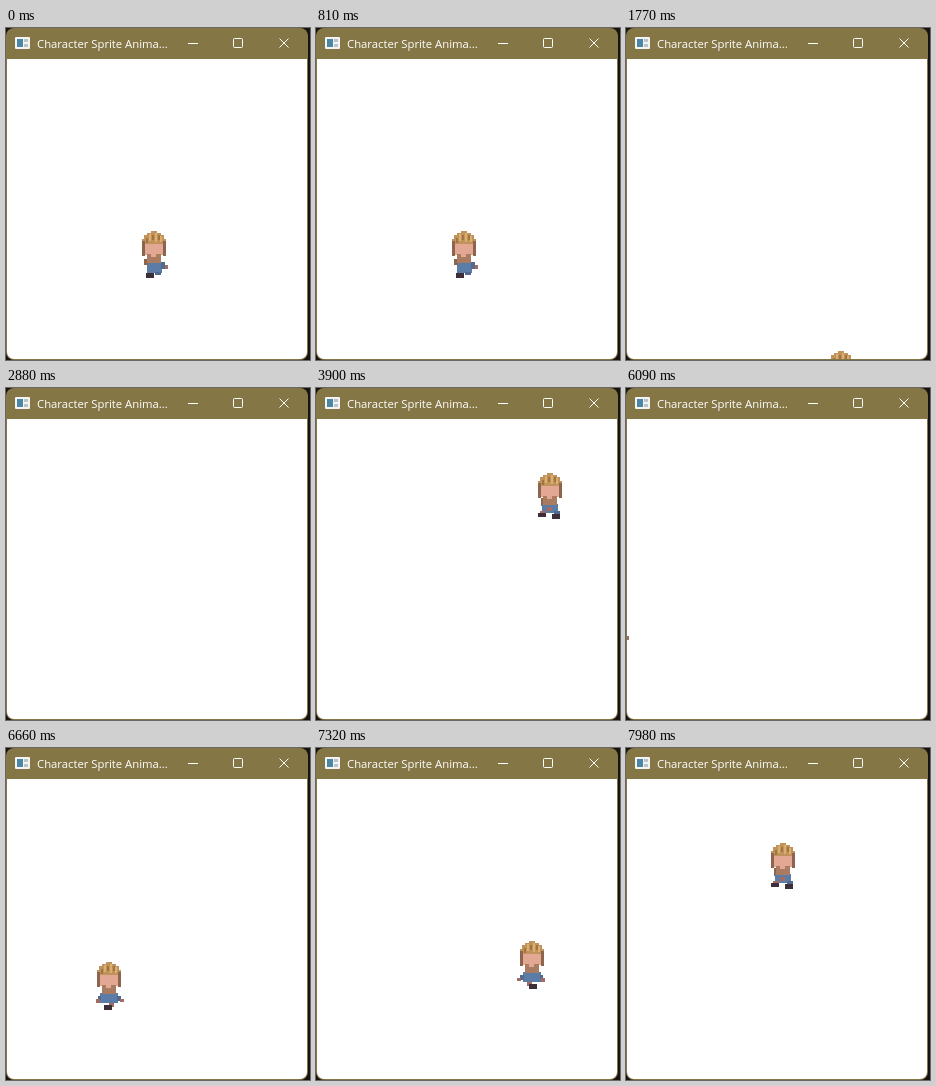
An HTML page with a canvas that plays this animation: 304 by 332 pixels, repeating every 8000 ms.

```html
<!DOCTYPE html>
<html lang="en">
<head>
<meta charset="utf-8">
<title>Sprite walk</title>
<style>
html, body { margin: 0; width: 100%; height: 100%; overflow: hidden; background: #17140f; }
canvas { display: block; }
</style>
</head>
<body>
<canvas width="304" height="332"></canvas>
<script>
const ctx = document.querySelector('canvas').getContext('2d');
const LOOP = 8000, TICK = 30, POSE_TIME = 100;
const BAR = '#857645';

// Way points of the head's top left corner: time, x, y.
const path = [
  [0, 136, 203], [815, 136, 203], [1435, 136, 323], [2010, 251, 323],
  [2440, 251, 237], [2700, 303, 237], [3460, 303, 85], [3495, 303, 85],
  [4560, 90, 85], [5130, -27, 85], [5280, -55, 85], [5930, -55, 214],
  [6090, -23, 214], [6660, 91, 214], [7220, 204, 214], [7690, 204, 117],
  [7800, 182, 95], [8000, 141, 95]
];

const colors = {
  hair: '#c0935d', light: '#dbb06c', dark: '#a17345', side: '#8d644d',
  skin: '#e3a893', beard: '#a97b60', shirt: '#5c7ca8', sleeve: '#526a90',
  hand: '#a06c63', shoe: '#3d2f39'
};

const head = [
  ['hair', 9, 0, 6, 4], ['hair', 5, 2, 14, 4], ['hair', 2, 4, 20, 5], ['hair', 0, 8, 24, 8],
  ['light', 7, 3, 2, 7], ['light', 13, 2, 2, 9], ['light', 18, 5, 2, 6],
  ['dark', 10, 4, 2, 5], ['dark', 4, 7, 2, 5], ['dark', 16, 4, 2, 5],
  ['side', 0, 10, 3, 15], ['side', 21, 10, 3, 15],
  ['skin', 3, 13, 18, 11], ['beard', 5, 23, 14, 9], ['skin', 9, 23, 5, 3]
];
const contact = [
  ['shirt', 5, 31, 15, 11], ['sleeve', 19, 31, 4, 7], ['hand', 23, 34, 3, 4],
  ['side', 2, 28, 4, 6], ['shoe', 4, 42, 8, 5], ['sleeve', 13, 41, 6, 3]
];
const passing = [
  ['shirt', 3, 31, 18, 10], ['sleeve', 0, 34, 4, 5], ['sleeve', 20, 34, 3, 4],
  ['hand', -3, 37, 4, 3], ['hand', 21, 37, 4, 4],
  ['hand', 7, 41, 5, 4], ['shoe', 9, 43, 8, 5]
];
const stride = [
  ['side', 3, 25, 4, 8], ['shirt', 4, 31, 16, 9], ['hand', 9, 34, 5, 4],
  ['hand', 2, 38, 6, 3], ['shoe', 0, 40, 8, 4], ['sleeve', 16, 38, 6, 4], ['shoe', 14, 41, 8, 5]
];
const mirror = parts => parts.map(([c, x, y, w, h]) => [c, 24 - x - w, y, w, h]);
const poses = [contact, passing, mirror(passing), stride];

function rect(color, x, y, w, h) {
  ctx.fillStyle = color;
  ctx.fillRect(x, y, w, h);
}

function panel(color, x, y, w, h, radii) {
  ctx.fillStyle = color;
  ctx.beginPath();
  ctx.roundRect(x, y, w, h, radii);
  ctx.fill();
}

function positionAt(t) {
  const next = path.findIndex(p => p[0] > t);
  const [t0, x0, y0] = path[next - 1], [t1, x1, y1] = path[next];
  const k = (t - t0) / (t1 - t0);
  return [Math.round(x0 + (x1 - x0) * k), Math.round(y0 + (y1 - y0) * k)];
}

function drawWindow() {
  rect('#17140f', 0, 0, 304, 332);
  panel(BAR, 0, 0, 302, 332, 8);
  panel('#fff', 1, 31, 300, 300, [0, 0, 7, 7]);

  panel('#f4f4f4', 9, 9, 15, 12, 1);
  rect('#4a87a5', 11, 11, 6, 8);
  rect('#b9c3c8', 18, 11, 4, 3);
  rect('#b9c3c8', 18, 16, 4, 3);

  ctx.fillStyle = '#fff';
  ctx.font = '11.3px "Open Sans", "Noto Sans", sans-serif';
  ctx.fillText('Character Sprite Anima...', 31, 20);

  ctx.strokeStyle = '#fff';
  ctx.lineWidth = 1;
  ctx.beginPath();
  ctx.moveTo(182, 15.5); ctx.lineTo(192, 15.5);
  ctx.roundRect(227.5, 10.5, 9, 9, 1);
  ctx.moveTo(273.5, 10.5); ctx.lineTo(282.5, 19.5);
  ctx.moveTo(282.5, 10.5); ctx.lineTo(273.5, 19.5);
  ctx.stroke();
}

function drawWalker(t) {
  const [x, y] = positionAt(t);
  const pose = poses[Math.floor(t / POSE_TIME) % poses.length];
  ctx.save();
  ctx.beginPath();
  ctx.roundRect(1, 31, 300, 300, [0, 0, 7, 7]);
  ctx.clip();
  ctx.translate(x, y);
  ctx.filter = 'blur(0.5px)';
  for (const [color, ...box] of [...pose, ...head]) rect(colors[color], ...box);
  ctx.restore();
}

function frame() {
  const t = Math.floor(performance.now() % LOOP / TICK) * TICK;
  drawWindow();
  drawWalker(t);
  requestAnimationFrame(frame);
}
frame();
</script>
</body>
</html>
```
